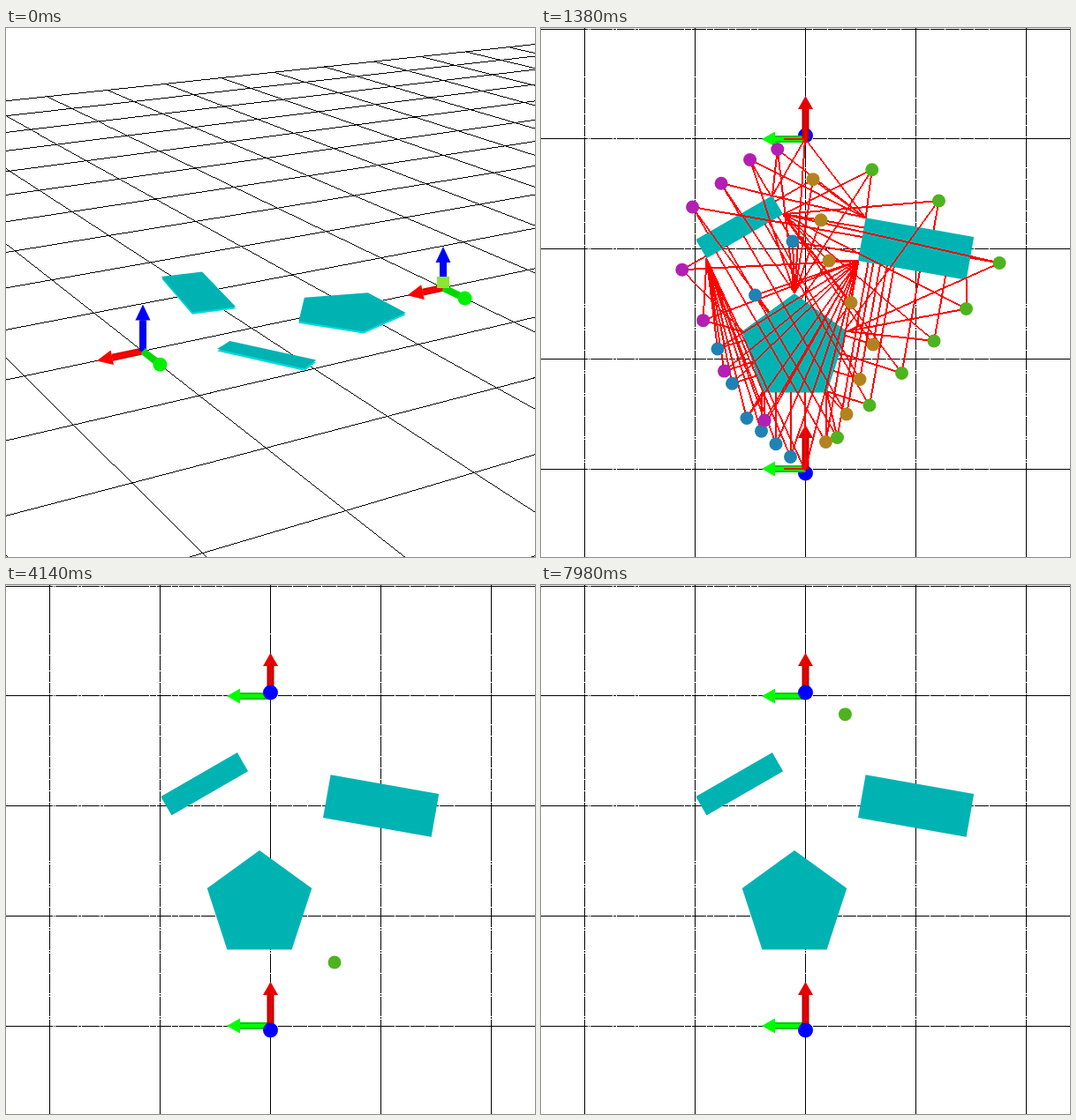
Write an HTML page with a canvas that moves like this. It is 599 by 600 pixels and loops after 8000 ms.

```html
<!DOCTYPE html>
<html>
<head>
<meta charset="utf-8">
<style>
html, body { margin: 0; width: 100%; height: 100%; overflow: hidden; background: #fff; }
canvas { display: block; }
</style>
</head>
<body>
<canvas id="stage" width="599" height="600"></canvas>
<script>
const ctx = document.getElementById('stage').getContext('2d');
const LOOP = 8000, STEP = 60;
const CLEAR_TIME = 2880, RIDE_TIME = 2940, SEGMENT = 600, SEGMENTS = 9;
const START = [299, 501], GOAL = [299, 125.5];
const TEAL = '#00b3b3', GREEN = '#4fb31f';

const obstacles = [
  regularPolygon(287, 363.2, 62.3, 5),
  box(224.7, 225.6, 100, 24.4, -30),
  box(424.6, 250.5, 124.5, 49.5, 10)
];

// Knots are [waypoint index, x, y]; the waypoints between them are evenly spaced.
const greenRoute = waypoints([5, 481.5, 318.5], [6, 519, 266.5], [7, 450.5, 196]);
const paths = [
  { color: GREEN, poses: [{ time: 660, points: greenRoute }] },
  { color: '#b3821f', poses: [
    { time: 660, points: waypoints([3, 351, 433], [6, 380, 346.5], [7, 363, 308], [8, 320.5, 285.5]) },
    { time: 1380, points: waypoints([2, 346, 438], [4, 376, 359], [6, 326, 264]) }] },
  { color: '#1f82b3', poses: [
    { time: 660, points: waypoints([3, 278, 495], [5, 238.5, 448.5], [7, 194, 344.5], [8, 257, 258]) },
    { time: 1380, points: waypoints([4, 233, 442.5], [6, 200, 364], [8, 285, 242]) },
    { time: 2700, points: waypoints([2, 240, 445], [4, 199, 364], [5, 217, 311], [7, 280.5, 245]) }] },
  { color: '#b31fb3', poses: [
    { time: 660, points: waypoints([2, 205, 381], [4, 152, 265], [5, 173, 202], [7, 238, 141]) },
    { time: 2700, points: waypoints([2, 212, 404], [4, 174, 291], [5, 169, 205], [7, 234, 165]) }] }
];

function clamp01(v) { return Math.max(0, Math.min(1, v)); }
function mix(p, q, k) { return p.map((v, i) => v + (q[i] - v) * k); }

function regularPolygon(cx, cy, radius, sides) {
  return Array.from({ length: sides }, (_, i) => {
    const angle = 2 * Math.PI * i / sides;
    return [cx + radius * Math.sin(angle), cy - radius * Math.cos(angle)];
  });
}

function box(cx, cy, width, height, degrees) {
  const c = Math.cos(degrees * Math.PI / 180), s = Math.sin(degrees * Math.PI / 180);
  return [[-1, -1], [1, -1], [1, 1], [-1, 1]].map(([i, j]) => {
    const x = i * width / 2, y = j * height / 2;
    return [cx + x * c - y * s, cy + x * s + y * c];
  });
}

function waypoints(...inner) {
  const knots = [[0, ...START], ...inner, [SEGMENTS, ...GOAL]];
  return Array.from({ length: SEGMENTS + 1 }, (_, n) => {
    const next = Math.max(1, knots.findIndex(knot => knot[0] >= n));
    const a = knots[next - 1], b = knots[next];
    return mix(a, b, (n - a[0]) / (b[0] - a[0])).slice(1);
  });
}

function pathAt({ poses }, t) {
  const next = poses.findIndex(pose => pose.time > t);
  if (next <= 0) return poses.at(next).points;
  const a = poses[next - 1], b = poses[next], k = (t - a.time) / (b.time - a.time);
  return a.points.map((p, n) => mix(p, b.points[n], k));
}

// Hard-edged line, thickened across its main direction.
function line(p, q, color, width = 1) {
  const dx = Math.abs(q[0] - p[0]), dy = Math.abs(q[1] - p[1]);
  const steps = Math.max(1, Math.ceil(Math.max(dx, dy)));
  const w = dy > dx ? width : 1, h = dy > dx ? 1 : width;
  ctx.fillStyle = color;
  for (let i = 0; i <= steps; i++) {
    const [x, y] = mix(p, q, i / steps);
    ctx.fillRect(Math.floor(x - (w - 1) / 2), Math.floor(y - (h - 1) / 2), w, h);
  }
}

function bar(p, q, color, width) {
  ctx.strokeStyle = color;
  ctx.lineWidth = width;
  ctx.beginPath();
  ctx.moveTo(...p);
  ctx.lineTo(...q);
  ctx.stroke();
}

function polygon(points, color) {
  ctx.fillStyle = color;
  ctx.beginPath();
  points.forEach(p => ctx.lineTo(...p));
  ctx.fill();
}

function disc([x, y], radius, color) {
  ctx.fillStyle = color;
  ctx.beginPath();
  ctx.arc(x, y, radius, 0, 7);
  ctx.fill();
}

function arrow(from, tip, color, shade, head = 15) {
  const dx = tip[0] - from[0], dy = tip[1] - from[1], length = Math.hypot(dx, dy);
  const nx = -dy / length * 8.5, ny = dx / length * 8.5;
  const base = mix(tip, from, head / length);
  bar(from, base, shade, 8);
  bar(from, base, color, 4);
  polygon([tip, [base[0] + nx, base[1] + ny], [base[0] - nx, base[1] - ny]], color);
}

function closestPoint(p, shape) {
  let best, bestDistance = Infinity;
  shape.forEach((a, i) => {
    const b = shape[(i + 1) % shape.length];
    const dx = b[0] - a[0], dy = b[1] - a[1];
    const k = clamp01(((p[0] - a[0]) * dx + (p[1] - a[1]) * dy) / (dx * dx + dy * dy));
    const q = mix(a, b, k), distance = Math.hypot(q[0] - p[0], q[1] - p[1]);
    if (distance < bestDistance) { best = q; bestDistance = distance; }
  });
  return best;
}

// Ground axes: u along the red arrow, v along the green one, z up.
function project(u, v, z = 0) {
  const w = 1 - 0.0391 * u - 0.0672 * v;
  return [(495 - 119.4 * u + 41.8 * v) / w, -245 + (539.7 - 117 * z) / w];
}

function ground([x, y], z) {
  return project((500.5 - y) / 125, (299.5 - x) / 125, z);
}

function drawPerspective() {
  for (let k = -10; k <= 10; k++) {
    line(project(-10, k), project(7, k), '#000');
    line(project(k, -10), project(k, 5), '#000');
  }
  for (const shape of obstacles) {
    const base = shape.map(p => ground(p, 0)), top = shape.map(p => ground(p, 0.018));
    polygon(base, '#00d9d9');
    polygon(top, TEAL);
  }
  for (const u of [0, 3]) {
    const origin = project(u, 0), tip = project(u, 0.32);
    arrow(origin, project(u + 0.4, 0), '#f00', '#d80000', 18);
    arrow(origin, project(u, 0, 0.4), '#00f', '#0000d8', 18);
    bar(origin, tip, '#00d800', 8);
    disc(tip, 8, '#00f000');
  }
  ctx.fillStyle = '#8ce632';
  ctx.fillRect(488, 282, 14, 13);
}

function drawTopView() {
  for (let k = 0; k < 5; k++) {
    const x = 49.5 + 125 * k, y = Math.max(1.5, 0.5 + 125 * k);
    line([x, 0], [x, 600], '#000');
    line([0, y], [599, y], '#000');
  }
  obstacles.forEach(shape => polygon(shape, TEAL));
}

function drawAxes(ballInFront) {
  for (const [y, tip, ball] of [[126, 77, 122], [500, 450, 505]]) {
    const drawBall = () => disc([299.5, ball], 8.5, '#00f');
    if (!ballInFront) drawBall();
    arrow([299.5, y], [250, y], '#0f0', '#00c800');
    arrow([299.5, y], [299.5, tip], '#e60000', '#b80000');
    if (ballInFront) drawBall();
    else line([275, y], [299, y], '#f00', 2);
  }
}

function drawSearch(t) {
  const current = paths.map(path => pathAt(path, t));
  drawAxes(false);
  for (const p of current.flat())
    for (const shape of obstacles) line(p, closestPoint(p, shape), '#f00', 2);
  current.forEach((points, i) =>
    points.slice(1, -1).forEach(p => disc(p, 7.5, paths[i].color)));
}

function drawRide(t) {
  const progress = Math.max(0, (t - RIDE_TIME) / SEGMENT), i = Math.floor(progress);
  disc(mix(greenRoute[i], greenRoute[i + 1], progress - i), 7.5, GREEN);
  drawAxes(true);
}

let shown = -1;
function render() {
  const t = Math.floor((performance.now() % LOOP) / STEP) * STEP;
  if (t !== shown) {
    shown = t;
    ctx.fillStyle = '#fff';
    ctx.fillRect(0, 0, 599, 600);
    if (t < STEP) drawPerspective();
    else {
      drawTopView();
      if (t < CLEAR_TIME) drawSearch(t);
      else drawRide(t);
    }
  }
  requestAnimationFrame(render);
}
render();
</script>
</body>
</html>
```
